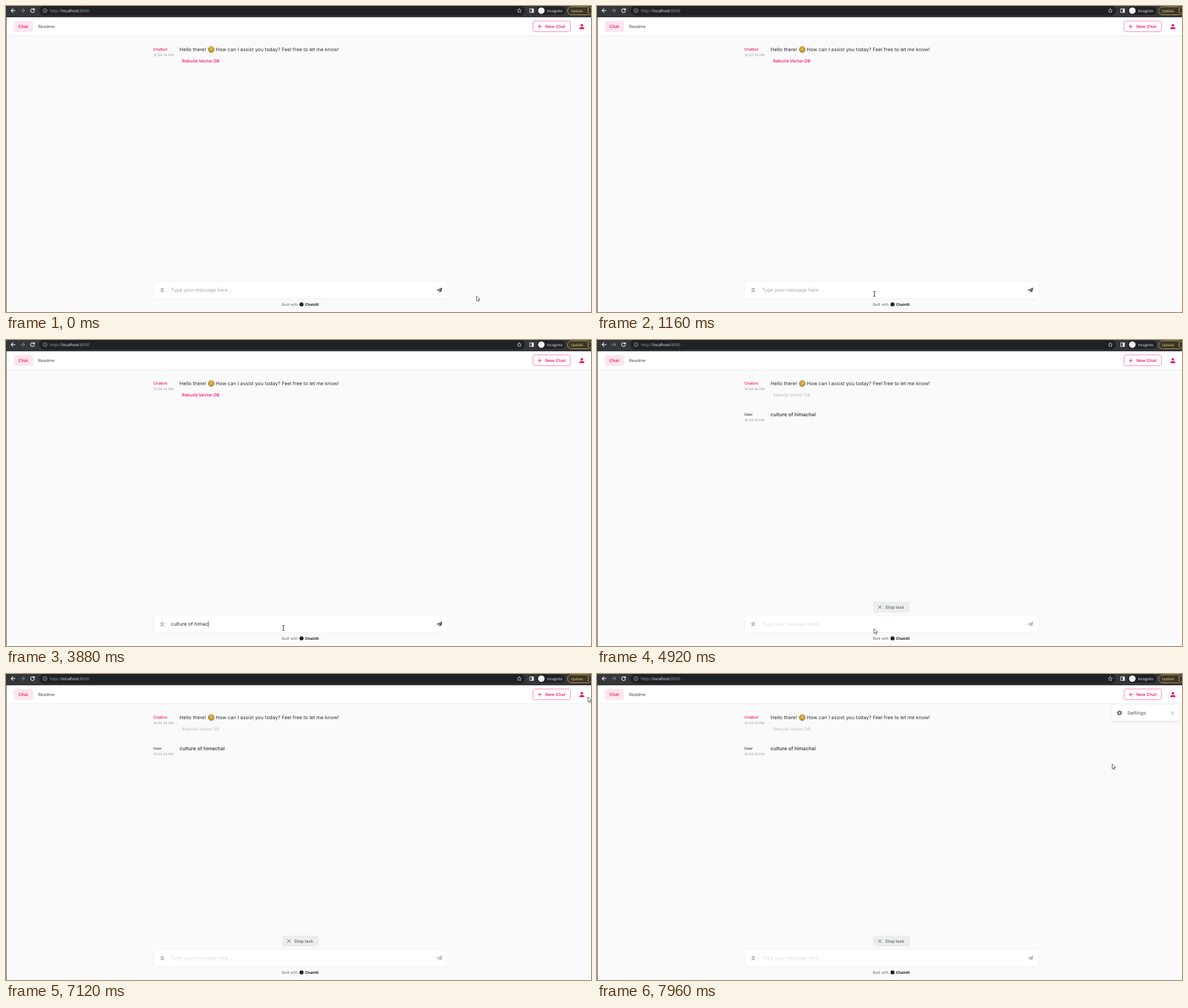
Recreate the animation shown at these times as an HTML page. Size 1034 px wide and 542 px high, loop 8000 ms.

```html
<!DOCTYPE html>
<html lang="en">
<head>
<meta charset="utf-8">
<title>Chat</title>
<style>
  html, body { margin: 0; width: 100%; height: 100%; overflow: hidden; background: #fafafa; }
  svg { display: block; width: 1034px; height: 542px; }
  text { font-family: Inter, "Liberation Sans", sans-serif; text-rendering: geometricPrecision; white-space: pre; }
  .bar text { font-family: "Open Sans", "Noto Sans", sans-serif; }
  .body { font-size: 8.62px; fill: #2b2b2b; }
  .msg { letter-spacing: .035px; }
  .btn { font-size: 7.48px; font-weight: 500; fill: #616161; }
  .wide { letter-spacing: .1px; }
  .name { font-size: 6.44px; font-weight: 500; fill: #303030; }
  .time { font-size: 5.93px; fill: #9a9a9a; }
  .pink { fill: #f80061; }
  .line { fill: none; stroke-linecap: round; stroke-linejoin: round; }
</style>
</head>
<body>
<svg viewBox="0 0 1034 542">
  <defs>
    <filter id="soft" x="-10%" y="-40%" width="120%" height="200%">
      <feDropShadow dx="0" dy="1" stdDeviation="1.8" flood-opacity=".13"/>
    </filter>
  </defs>
  <rect width="1034" height="542" fill="#fafafa"/>

  <!-- browser bar -->
  <g class="bar">
    <rect width="1034" height="20" fill="#35363a"/>
    <rect x="59" y="-1" width="858" height="18.2" rx="9" fill="#202124"/>
    <g class="line" stroke="#f1f1f1" stroke-width="1.2">
      <path d="M16 8.2H9M12.2 5 9 8.2l3.2 3.2"/>
      <path stroke="#7d7e81" d="M26 8.2h7M29.8 5 33 8.2l-3.2 3.2"/>
      <path d="M49.5 6A3.4 3.4 0 1 0 50.2 9M50.3 4.4v2.4h-2.5"/>
    </g>
    <g class="line" stroke="#b5b6b9" stroke-width=".8">
      <circle cx="68.8" cy="8.2" r="3.5"/>
      <path d="M68.8 8v2M68.8 6.4v.1"/>
    </g>
    <text y="10.8" x="77.6" font-size="7.2" fill="#9aa0a6">http://<tspan fill="#f4f4f4">localhost</tspan>:8000</text>
    <path class="line" stroke="#dcdcdc" stroke-width=".8" d="M907.3 4.6l1.1 2.4 2.6.3-1.9 1.8.5 2.6-2.3-1.3-2.3 1.3.5-2.6-1.9-1.8 2.6-.3z"/>
    <rect x="925.7" y="5" width="6.6" height="6.4" fill="none" stroke="#f1f1f1"/>
    <rect x="929.2" y="5" width="3.2" height="6.4" fill="#f1f1f1"/>
    <rect x="938.5" y="1" width="50" height="14.5" rx="7.2" fill="#202124"/>
    <circle cx="946.2" cy="8.2" r="5.8" fill="#f1f1f1"/>
    <text x="956.2" y="10.5" font-size="6.3" font-weight="500" fill="#fff">Incognito</text>
    <rect x="992.5" y="1.5" width="43" height="14" rx="7" fill="#3a362c" stroke="#c8a548"/>
    <text x="998.4" y="10.5" font-size="6.25" font-weight="500" fill="#fdd663">Update</text>
    <g fill="#fdd663"><circle cx="1029" cy="5" r=".9"/><circle cx="1029" cy="8.2" r=".9"/><circle cx="1029" cy="11.4" r=".9"/></g>
  </g>

  <!-- header -->
  <rect y="20" width="1034" height="32.5" fill="#fff"/>
  <rect y="52.3" width="1034" height=".8" fill="#e8e8e8"/>
  <rect x="13.7" y="26.8" width="34.4" height="19.2" rx="3.8" fill="#fee5ee"/>
  <text class="btn pink" x="22.1" y="39">Chat</text>
  <text class="btn" x="56.8" y="39">Readme</text>
  <rect x="931.5" y="26.5" width="66" height="19" rx="3.6" fill="#fff" stroke="#fb80b0"/>
  <path class="line" stroke="#f80061" stroke-width=".9" d="M940.4 36.4h6M943.4 33.4v6"/>
  <text class="btn pink wide" x="953.2" y="39">New Chat</text>
  <circle id="hover" cx="1017.8" cy="36.4" r="11"/>
  <g class="pink">
    <circle cx="1017.8" cy="34.1" r="2.2"/>
    <path d="M1013.4 40.8v-1.2c0-1.5 2.9-2.3 4.4-2.3s4.4.8 4.4 2.3v1.2z"/>
  </g>
  <rect y="20" width=".9" height="522" fill="#3c3c3c"/>

  <!-- messages -->
  <text class="name pink" x="260.6" y="79.4">Chatbot</text>
  <text class="time" x="260.6" y="89.4">10:04:34 PM</text>
  <text class="body msg" x="306.8" y="80.2">Hello there!</text>
  <circle cx="362.8" cy="77.2" r="5.1" fill="#f7c443" stroke="#5e4c20" stroke-width=".9"/>
  <g class="line" stroke="#4d3712" stroke-width=".9">
    <path d="M359.6 76.2q1-1.5 2 0M364 76.2q1-1.5 2 0M359.8 78.6q3 3.4 6 0"/>
  </g>
  <text class="body msg" x="370.8" y="80.2">How can I assist you today? Feel free to let me know!</text>
  <text class="btn pink wide" id="rebuild" x="311.3" y="100.3">Rebuild Vector DB</text>
  <g id="sent">
    <text class="name" x="260.6" y="134">User</text>
    <text class="time" x="260.6" y="144.2">10:04:43 PM</text>
    <text class="body msg" x="306.8" y="135" font-weight="500">culture of himachal</text>
  </g>

  <!-- composer -->
  <g id="stop">
    <rect x="488" y="463.3" width="65" height="19.4" rx="3.6" fill="#eceded"/>
    <path class="line" stroke="#555" stroke-width=".9" d="M497.3 470.4l5.4 5.4M502.7 470.4l-5.4 5.4"/>
    <text class="btn" x="509.6" y="476">Stop task</text>
  </g>
  <rect x="261" y="487.8" width="520" height="30.6" rx="4" fill="#fff" stroke="#ececec" stroke-width=".8"/>
  <path class="line" stroke="#444" stroke-width="1" d="M273.6 502.6l2.6-2.6 2.6 2.6M273.6 506.4l2.6-2.6 2.6 2.6"/>
  <text class="body" id="hint" x="291.4" y="506.3">Type your message here...</text>
  <text class="body" id="typed" x="291.4" y="506.3"></text>
  <rect id="caret" y="497.6" width=".7" height="11" fill="#222"/>
  <path id="send" d="M771.2 498.6 760.8 503.2l3.2 1.3 5-3.8-3.8 4.3v2.8l1.6-2 2.6 1z"/>
  <text x="487.7" y="530.7" font-size="6.4" fill="#616161">Built with</text>
  <circle cx="522.3" cy="528.5" r="3.6" fill="#222"/>
  <text x="528.4" y="530.8" font-size="6.5" font-weight="700" fill="#222">Chainlit</text>

  <!-- menu -->
  <g id="menu">
    <rect x="909.5" y="54.8" width="119" height="28.2" rx="3.4" fill="#fff" filter="url(#soft)"/>
    <circle cx="923.5" cy="69" r="2.6" fill="none" stroke="#666" stroke-width="2"/>
    <circle cx="923.5" cy="69" r="4" fill="none" stroke="#666" stroke-width="1.2" stroke-dasharray="2.1 2.09"/>
    <text class="body" x="937.2" y="72.2" style="fill:#505050">Settings</text>
    <text x="1015" y="71.7" font-size="7.5" fill="#858585">S</text>
  </g>

  <!-- pointers -->
  <path id="arrow" d="M0 0v8.6l2-1.8 1.4 3 1.4-.7-1.4-2.9h2.7z" fill="#fff" stroke="#222" stroke-width=".75" stroke-linejoin="round"/>
  <path id="beam" class="line" stroke="#222" stroke-width=".8" d="M-2-4.4h1.3q.7 0 .7.6v7.6q0 .6-.7.6H-2M2-4.4H.7Q0-4.4 0-3.8v7.6q0 .6.7.6H2"/>
</svg>
<script>
const LOOP = 8000, TICK = 40;
const MESSAGE = 'culture of himachal';
const FIRST_KEY = 1300, KEY_GAP = 162.5, SENT = 4800, STOP = 4920;

// pointer moves: start, end, target and upward bow
const START = { x: 831.7, y: 513.6 };
const moves = [
  { from: 40, to: 840, x: 490.4, y: 509.9, bow: 34 },
  { from: 4800, to: 4920, x: 489.7, y: 511.4, bow: 0 },
  { from: 6800, to: 7120, x: 1028.6, y: 41, bow: 0 },
  { from: 7120, to: 7240, x: 1017.6, y: 32, bow: 0 },
  { from: 7680, to: 7960, x: 910.5, y: 159.4, bow: 0 }
];

const el = {};
document.querySelectorAll('svg [id]').forEach(e => el[e.id] = e);

const clamp = v => Math.min(1, Math.max(0, v));
const ease = u => u * u * (3 - 2 * u);
const show = (e, on) => e.style.display = on ? '' : 'none';

function pointer(t) {
  let { x, y } = START;
  for (const m of moves) {
    const u = ease(clamp((t - m.from) / (m.to - m.from)));
    x += (m.x - x) * u;
    y += (m.y - y) * u - m.bow * Math.sin(Math.PI * u);
  }
  return { x, y };
}

function draw(t) {
  const sent = t >= SENT;
  const typed = Math.floor((t - FIRST_KEY) / KEY_GAP) + 1;
  const count = sent ? 0 : Math.max(0, Math.min(MESSAGE.length, typed));

  el.typed.textContent = MESSAGE.slice(0, count);
  show(el.hint, !count);
  el.hint.style.fill = sent ? '#dedede' : '#a6a6a6';
  el.send.style.fill = sent ? '#b4b4b4' : '#555';
  el.rebuild.style.fill = sent ? '#c2c2c2' : '';
  show(el.sent, sent);
  show(el.stop, t >= STOP);

  show(el.caret, count);
  el.caret.setAttribute('x', 291.3 + el.typed.getComputedTextLength());

  el.menu.style.opacity = clamp((t - 7480) / 160);
  el.hover.style.opacity = t < 7200 ? 0 : .03;

  const { x, y } = pointer(Math.floor(t / TICK) * TICK);
  const overInput = !sent && x > 261 && x < 781 && y > 488;
  show(el.beam, overInput);
  show(el.arrow, !overInput);
  (overInput ? el.beam : el.arrow).setAttribute('transform', `translate(${x} ${y})`);
}

const start = performance.now();
function frame() {
  draw((performance.now() - start) % LOOP);
  requestAnimationFrame(frame);
}
frame();
</script>
</body>
</html>
```
